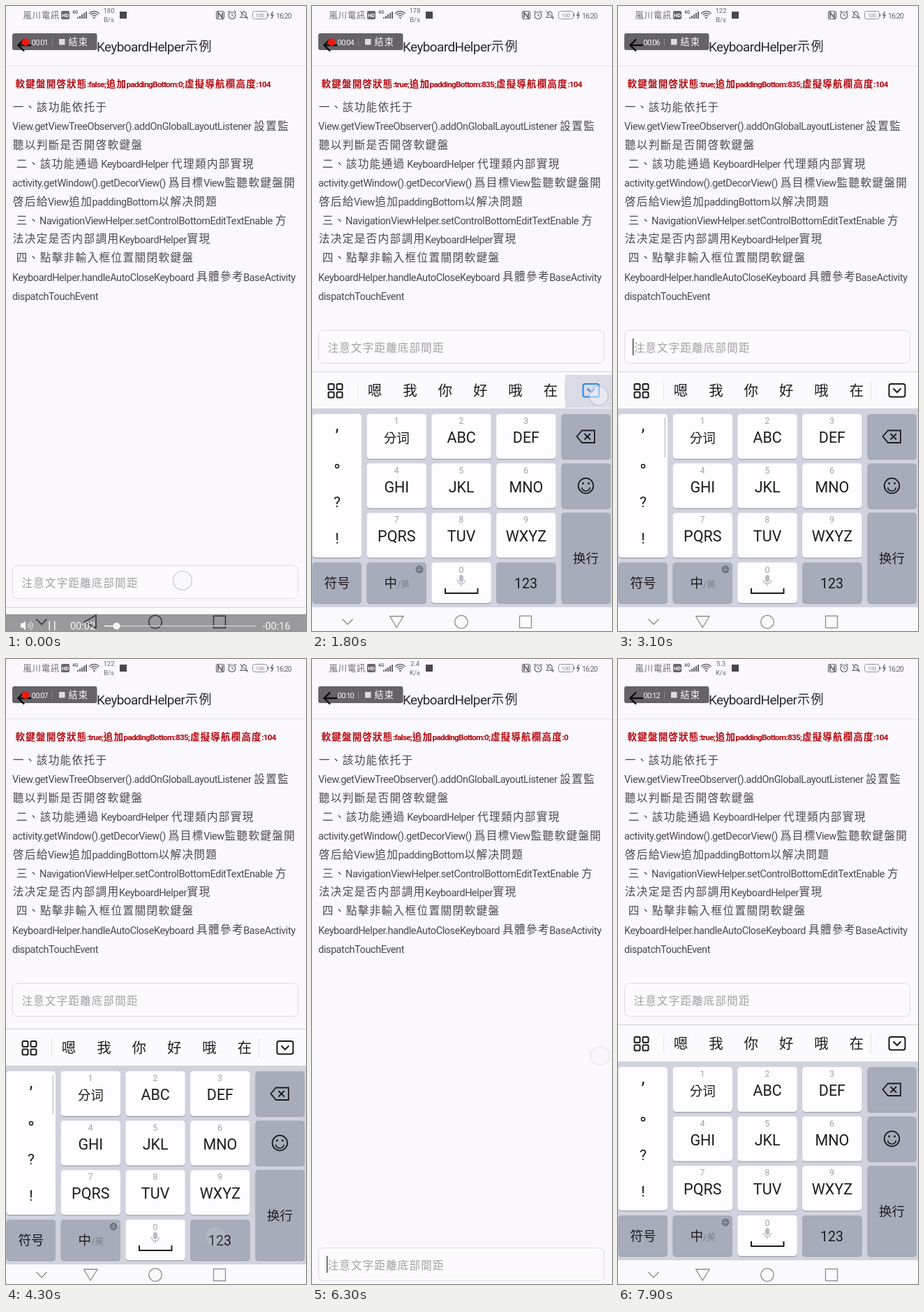
Write an HTML page with a canvas that moves like this. It is 430 px wide and 893 px high and loops after 8000 ms.

```html
<!DOCTYPE html>
<html lang="zh-Hant">
<head>
<meta charset="utf-8">
<title>KeyboardHelper</title>
<style>
html, body { margin: 0; width: 100%; height: 100%; overflow: hidden; background: #faf8fc; }
canvas { display: block; width: 430px; height: 893px; }
</style>
</head>
<body>
<canvas id="stage" width="430" height="893"></canvas>
<script>
const ctx = document.getElementById('stage').getContext('2d');
const LOOP = 8000, W = 430, H = 893, NAV = 859;
const LATIN = 'Roboto, "Noto Sans", sans-serif';
const CJK = '"Noto Sans CJK JP", "Noto Sans CJK TC", "Noto Sans CJK SC", sans-serif';
const HANS = 'Roboto, "Noto Sans CJK SC", sans-serif';

const clamp = v => Math.max(0, Math.min(1, v));
const ramp = (t, a, b) => clamp((t - a) / (b - a));
const easeOut = p => 1 - (1 - p) * (1 - p);
// value of the last [time, value] step that has begun
const pick = (steps, t) => steps.filter(s => t >= s[0]).pop()[1];

const layouts = {
  closed: { y: 799, open: false, pad: 0, nav: 104 },
  open: { y: 463, open: true, pad: 835, nav: 104 },
  openFull: { y: 484, open: true, pad: 887, nav: 0 },
  closedFull: { y: 841, open: false, pad: 0, nav: 0 }
};
const layoutSteps = [[0, 'closed'], [300, 'open'], [1980, 'closed'], [2760, 'open'], [3560, 'closed'],
  [4200, 'open'], [4800, 'openFull'], [6060, 'closedFull'], [6800, 'closed'], [7560, 'open']];
const speedSteps = [[0, ['180', 'B/s']], [600, ['178', 'B/s']], [2200, ['122', 'B/s']],
  [4600, ['2.4', 'K/s']], [6900, ['5.3', 'K/s']]];
const slides = [ // keyboard: start, end, shown
  [250, 450, 1], [1900, 2150, 0], [2650, 2850, 1], [3500, 3750, 0],
  [4130, 4325, 1], [6000, 6250, 0], [7480, 7680, 1]];
const touches = [ // x, y, from, to, rise
  [253, 821, -100, 150, 0], [411, 557, 1650, 1900, 0], [262, 822, 2500, 2680, 0],
  [300, 330, 3300, 3450, 0], [300, 825, 4080, 4180, 0], [50, 880, 4500, 4680, 0],
  [413, 567, 5750, 6210, 0], [214, 885, 6500, 6700, 70], [280, 822, 7400, 7520, 0]];

function text(s, x, y, size, color, align = 'left', family = LATIN, weight = 400) {
  ctx.font = `${weight} ${size}px ${family}`;
  ctx.fillStyle = color;
  ctx.textAlign = align;
  ctx.fillText(s, x, y);
}
// Han letters stand slightly small in their cells
function han(s, x, y, cell, color, weight = 300) {
  ctx.letterSpacing = cell * 0.08 + 'px';
  text(s, x + cell * 0.04, y - cell * 0.02, cell * 0.92, color, 'left', CJK, weight);
  ctx.letterSpacing = '0px';
  return s.length * cell;
}
function latin(s, x, y, size, tight, color, weight = 400) {
  ctx.letterSpacing = tight + 'px';
  text(s, x, y, size, color, 'left', LATIN, weight);
  const w = ctx.measureText(s).width;
  ctx.letterSpacing = '0px';
  return w;
}
// runs of Han and Latin letters set in their own sizes
function mixed(s, x, y, cell, size, tight, color, hanWeight = 300, weight = 400) {
  for (const run of s.split(/([\u3000-\u9fff]+)/)) {
    if (!run) continue;
    x += /[\u3000-\u9fff]/.test(run)
      ? han(run, x, y, cell, color, hanWeight)
      : latin(run, x, y, size, tight, color, weight);
  }
}
function box(x, y, w, h, r, fill, stroke, lw = 1) {
  ctx.beginPath();
  ctx.roundRect(x, y, w, h, r);
  if (fill) { ctx.fillStyle = fill; ctx.fill(); }
  if (stroke) { ctx.strokeStyle = stroke; ctx.lineWidth = lw; ctx.stroke(); }
}
function path(color, lw, pts, close) {
  ctx.beginPath();
  for (let i = 0; i < pts.length; i += 2) ctx.lineTo(pts[i], pts[i + 1]);
  if (close) ctx.closePath();
  ctx.strokeStyle = color;
  ctx.lineWidth = lw;
  ctx.stroke();
}
function arc(x, y, r, color, lw, a = 0, b = Math.PI * 2) {
  ctx.beginPath();
  ctx.arc(x, y, r, a, b);
  ctx.strokeStyle = color;
  ctx.lineWidth = lw;
  ctx.stroke();
}
function dot(x, y, r, color) {
  ctx.beginPath();
  ctx.arc(x, y, r, 0, Math.PI * 2);
  ctx.fillStyle = color;
  ctx.fill();
}
function rect(x, y, w, h, color) {
  ctx.fillStyle = color;
  ctx.fillRect(x, y, w, h);
}

function statusBar(t) {
  const c = '#68666a', [num, unit] = pick(speedSteps, t);
  han('嵐川電訊', 24, 18, 13.2, c);
  box(79, 7, 12, 12, 2, c);
  text('HD', 85, 16, 7.5, '#fff', 'center', LATIN, 700);
  text('4G', 95, 11, 6.5, c, 'left', LATIN, 700);
  for (let i = 0; i < 5; i++) rect(102 + i * 3, 16 - i * 2, 2, 2 + i * 2, c);
  for (const r of [3.5, 6.5, 9.5]) arc(126.5, 17, r, c, 1.4, -Math.PI * 0.78, -Math.PI * 0.22);
  dot(126.5, 17, 1.3, c);
  text(num, 147.5, 10, 9.5, c, 'center');
  text(unit, 147.5, 23, 9.5, c, 'center');
  rect(163, 8, 10, 10, '#49474b');
  box(301.5, 7.5, 11, 11, 2, null, c, 1.2);
  path(c, 1.8, [304, 17, 304, 9, 310, 17, 310, 9]);
  arc(324, 13.5, 5, c, 1.2);
  path(c, 1.1, [324, 10.5, 324, 13.5, 326.5, 14.5]);
  path(c, 1.2, [318, 9, 321, 7]);
  path(c, 1.2, [327, 7, 330, 9]);
  path(c, 1.1, [336, 16.5, 338, 14, 338, 10, 341, 7.5, 344, 10, 344, 14, 346, 16.5], true);
  path(c, 1.1, [335.5, 7, 346.5, 19]);
  box(353.5, 7.5, 21, 11, 3, null, '#939196', 1);
  rect(375, 11, 1.5, 4, '#939196');
  text('100', 364, 16, 7.5, '#88868b', 'center');
  path(c, 1.5, [382.5, 8, 380, 13, 383, 13, 380.5, 18]);
  latin('16:20', 387, 17.5, 10.5, -0.9, c);
}

function header(clock) {
  mixed('KeyboardHelper示例', 130, 64.5, 19.5, 19, -0.62, '#2b292c', 350);
  rect(0, 85, W, 1, '#e4e2e6');
  box(9, 39, 121.5, 24, 3, '#656367');
  path('#0d0c0e', 2.4, [36, 56, 18, 56]);
  path('#0d0c0e', 2.4, [26, 47.5, 17.5, 56, 26, 64.5]);
  if (clock % 1 >= 0.3) dot(28, 51.5, 5.2, '#f5180c');
  latin('00:' + String(Math.floor(clock)).padStart(2, '0'), 36.5, 55.5, 11, -0.8, '#f4f2f5');
  rect(66, 46, 1, 11, '#88868a');
  rect(76, 47, 8.5, 8.5, '#dddbdf');
  han('結束', 89, 56, 14.3, '#f6f4f7', 400);
}

const lines = [
  [9, '一、該功能依托于'],
  [9, 'View.getViewTreeObserver().addOnGlobalLayoutListener 設置監'],
  [9, '聽以判斷是否開啓軟鍵盤'],
  [14, '二、該功能通過 KeyboardHelper 代理類内部實現'],
  [9, 'activity.getWindow().getDecorView() 爲目標View監聽軟鍵盤開'],
  [9, '啓后給View追加paddingBottom以解决問題'],
  [14, '三、NavigationViewHelper.setControlBottomEditTextEnable 方'],
  [9, '法决定是否内部調用KeyboardHelper實現'],
  [14, '四、點擊非輸入框位置關閉軟鍵盤'],
  [9, 'KeyboardHelper.handleAutoCloseKeyboard 具體參考BaseActivity'],
  [9, 'dispatchTouchEvent']
];
function page(state, caret) {
  mixed(`軟鍵盤開啓狀態:${state.open};追加paddingBottom:${state.pad};虛擬導航欄高度:${state.nav}`,
    13, 116, 14.7, 11.8, -0.75, '#b3060e', 600, 600);
  lines.forEach(([x, s], i) => mixed(s, x, 150.5 + i * 26.9, 17, 14.5, -0.43, '#4b494d'));
  box(9.5, state.y + 0.5, 409, 47, 7, '#fcfafd', '#dddbe0');
  han('注意文字距離底部間距', 22, state.y + 31, 16.7, '#a19fa4');
  if (caret) rect(21, state.y + 12, 1.2, 24, '#29272a');
}

function key(x, y, w, h, gray) {
  box(x, y + 1.2, w, h, 4.5, '#9da0ad');
  box(x, y, w, h, 4.5, gray ? '#a7acba' : '#fdfcfe');
}
const ink = '#1c1b1f';
function keyboard(dy, pressed, bar, extend) {
  ctx.save();
  ctx.translate(0, Math.round(dy));
  rect(0, 523, W, 52, '#fbfafd');
  rect(0, 522, W, 1.3, '#dad8de');
  rect(0, 575, W, extend ? 400 : NAV - 575, '#d0d2dd');
  if (!extend) rect(0, NAV, W, 60, '#faf9fb');

  for (const x of [23.5, 35.5]) for (const y of [540, 551.5]) box(x, y, 8, 8, 1.8, null, ink, 2);
  rect(65, 536, 1, 27, '#e6e4ea');
  rect(362, 536, 1, 27, '#e0dee4');
  [...'嗯我你好哦在'].forEach((s, i) => text(s, 90 + i * 50.4, 557, 20.5, ink, 'center', CJK));
  if (pressed) rect(363, 527, 67, 47, '#dadbe5');
  const tint = pressed ? '#2a86e0' : ink;
  box(388.5, 540, 23, 18.5, 3, null, tint, 2);
  path(tint, 2, [394.5, 546.5, 400, 552, 405.5, 546.5]);

  key(0.5, 583, 70.5, 205);
  if (bar) box(66, 588, 2.5, 57, 1, '#dad9dd');
  text(',', 36, 607, 25, ink, 'center');
  arc(36, 657.5, 2.5, ink, 1.5);
  text('?', 36, 716, 21, ink, 'center');
  text('!', 36, 767.5, 21, ink, 'center');

  ['分词', 'ABC', 'DEF', 'GHI', 'JKL', 'MNO', 'PQRS', 'TUV', 'WXYZ'].forEach((s, i) => {
    const x = 78.5 + i % 3 * 92.8, y = 583 + Math.floor(i / 3) * 70.6;
    key(x, y, 85.5, 64);
    text(i + 1, x + 42.5, y + 14, 12.5, '#a3a2a8', 'center');
    text(s, x + 42.8, y + 41, i ? 21.5 : 18.5, ink, 'center', HANS);
  });

  key(357.5, 583, 70.5, 64, true);
  path(ink, 1.8, [379.5, 615, 387, 606.5, 405, 606.5, 405, 624, 387, 624], true);
  path(ink, 1.8, [390.5, 611, 399, 619.5]);
  path(ink, 1.8, [399, 611, 390.5, 619.5]);
  key(357.5, 653.5, 70.5, 64, true);
  arc(392.5, 685.5, 10.8, ink, 1.8);
  arc(392.5, 687, 6, ink, 1.7, 0.15, Math.PI - 0.15);
  dot(388.5, 682, 1.5, ink);
  dot(396.5, 682, 1.5, ink);
  key(357.5, 724, 70.5, 129, true);
  text('换行', 392.5, 796, 18.5, ink, 'center', HANS);

  key(0.5, 795, 70.5, 58, true);
  text('符号', 36, 831, 18.5, ink, 'center', HANS);
  key(78.5, 795, 85.5, 58, true);
  text('中', 103.5, 831, 18.5, ink, 'left', HANS);
  text('/英', 122, 831, 12.5, '#777b88', 'left', HANS);
  arc(154, 805, 4.8, '#555965', 1);
  ctx.beginPath();
  ctx.ellipse(154, 805, 2.2, 4.8, 0, 0, Math.PI * 2);
  ctx.stroke();
  path('#555965', 0.9, [149.5, 803.2, 158.5, 803.2]);
  path('#555965', 0.9, [149.5, 807, 158.5, 807]);
  key(171.3, 795, 85.5, 58);
  text('0', 214, 809.5, 12.5, '#a3a2a8', 'center');
  box(211, 813, 6, 10, 3, '#b9bbc5');
  arc(214, 820, 5.5, '#b9bbc5', 1.4, 0, Math.PI);
  path('#b9bbc5', 1.4, [214, 825.5, 214, 829]);
  path(ink, 2, [191, 832, 191, 839, 237.5, 839, 237.5, 832]);
  key(264.1, 795, 85.5, 58, true);
  text('123', 306.5, 831.5, 19.6, ink, 'center');
  ctx.restore();
}

function navIcons(dy, open) {
  const c = open ? '#8c8a8f' : '#39373b', lw = open ? 1.3 : 1.6;
  ctx.save();
  ctx.translate(0, dy);
  path(c, lw, [43.5, 876, 51, 883.5, 58.5, 876]);
  path(c, lw, open ? [111.5, 872, 131, 872, 121.2, 888] : [129, 870.5, 129, 889, 112.5, 880], true);
  arc(214, 880, 9.3, c, lw);
  ctx.strokeRect(297.5, 871.5, 17, 17);
  ctx.restore();
}

function player(t, alpha) {
  ctx.save();
  ctx.globalAlpha = alpha;
  rect(0, 869, W, 24, '#9a999b');
  navIcons(0, t >= 300);
  const c = '#f6f6f6', s = 2 + Math.floor(t / 800);
  ctx.fillStyle = c;
  ctx.beginPath();
  for (const [x, y] of [[21, 882], [24, 882], [28, 879], [28, 892], [24, 888], [21, 888]]) ctx.lineTo(x, y);
  ctx.fill();
  for (const r of [4, 7, 10]) arc(28, 885.5, r, c, 1, -0.7, 0.7);
  rect(61.5, 879, 1.5, 13, c);
  rect(69, 879, 1.5, 13, c);
  text('00:0' + s, 110, 890.5, 14.5, c, 'center');
  rect(141, 885, 217, 1.5, '#c9c8ca');
  const knob = 158.5 + t * 0.012;
  rect(141, 885, knob - 141, 1.5, c);
  dot(knob, 886, 5, c);
  text('-00:' + (18 - s), 387.5, 890.5, 14.5, c, 'center');
  ctx.restore();
}

function touch(t, [x, y, from, to, rise]) {
  const a = ramp(t, from, from + 60) * (1 - ramp(t, to, to + 160));
  if (a <= 0) return;
  ctx.save();
  ctx.globalAlpha = a;
  const cy = y - rise * ramp(t, from, to);
  dot(x, cy, 13.5, 'rgba(244,245,253,.5)');
  arc(x, cy, 13.5, 'rgba(184,184,214,.75)', 1.2);
  ctx.restore();
}

function shown(t) {
  let v = 0;
  for (const [a, b, to] of slides) {
    if (t < a) break;
    const p = ramp(t, a, b);
    v = to ? easeOut(p) : 1 - p * p;
  }
  return v;
}

function draw(t) {
  const clock = 1.98 + t * 0.0013;
  const state = layouts[pick(layoutSteps, t)];
  const hide = easeOut(ramp(t, 4680, 4860)) * (1 - easeOut(ramp(t, 6650, 6850)));
  const k = shown(t);
  const half = clock % 1 < 0.5;
  const caret = t > 300 && (t > 2000 && t < 6700 ? half : !half);

  rect(0, 0, W, H, '#faf8fc');
  statusBar(t);
  header(clock);
  page(state, caret);
  if (hide < 1) {
    rect(0, NAV + 34 * hide, W, 40, '#faf9fb');
    rect(0, NAV + 34 * hide, W, 1, '#d5d3d8');
  }
  if (k > 0) {
    const bar = (t > 2700 && t < 3500) || (t > 4100 && t < 5000);
    const pressed = (t >= 1700 && t < 1900) || (t >= 5800 && t < 6000);
    keyboard((1 - k) * 371 + 21 * hide, pressed, bar, hide > 0);
  }
  if (hide < 1) navIcons(34 * hide, state.open);
  const veil = 1 - ramp(t, 1000, 1400);
  if (veil > 0) player(t, veil);
  touches.forEach(p => touch(t, p));
}

const start = performance.now();
function tick(now) {
  draw(Math.max(0, now - start) % LOOP);
  requestAnimationFrame(tick);
}
draw(0);
requestAnimationFrame(tick);
</script>
</body>
</html>
```
